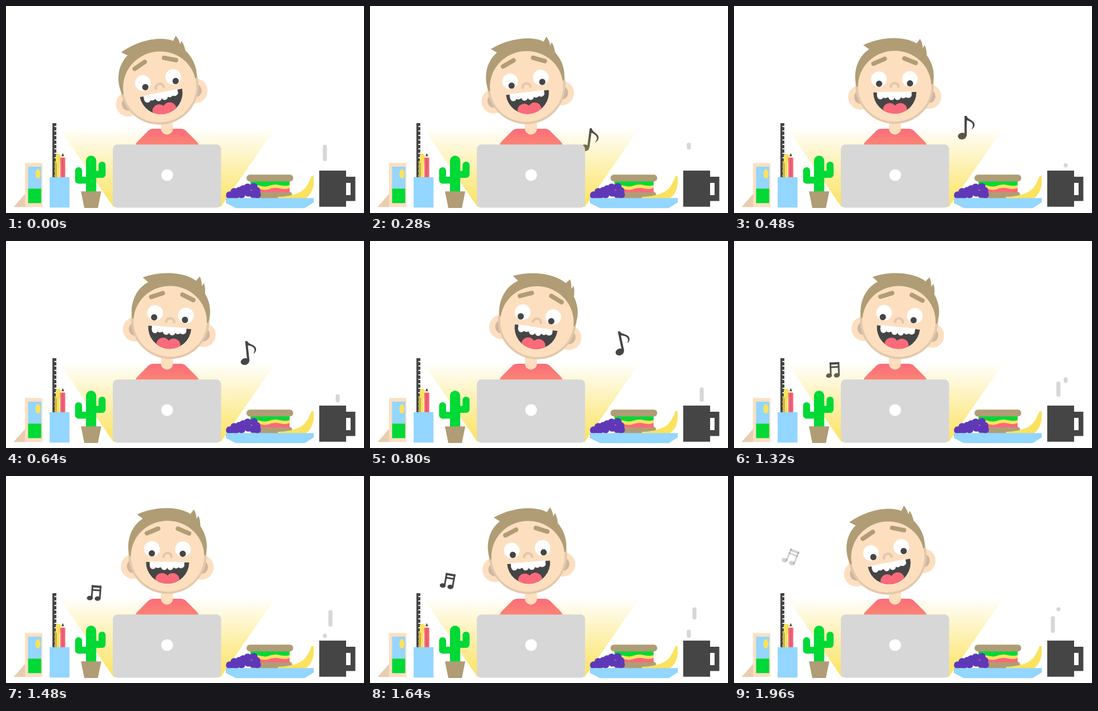
Recreate the animation shown at these times as an HTML page with a canvas. Size 640x371 px, loop 2000 ms.

```html
<!DOCTYPE html>
<html lang="en">
<head>
<meta charset="utf-8">
<title>Happy at the desk</title>
<style>
html, body { margin: 0; width: 100%; height: 100%; overflow: hidden; background: #fff; }
canvas { display: block; width: 640px; height: 371px; }
</style>
</head>
<body>
<canvas id="stage" width="640" height="371"></canvas>
<script>
const ctx = document.getElementById('stage').getContext('2d');
const LOOP = 2000;
const DARK = '#454545', GREY = '#d7d7d7', SKIN = '#fddfc0', SHADE = '#e2c9ab', EAR = '#cdb7a2',
  BROWN = '#b09d75', PINK = '#fb6a7b', BLUE = '#93d6ff', GREEN = '#00d936',
  YELLOW = '#fbe25e', PURPLE = '#5f38b8', WHITE = '#fff';

const smooth = p => { p = Math.min(1, Math.max(0, p)); return p * p * (3 - 2 * p); };

function fill(color, path) {
  ctx.fillStyle = color;
  ctx.fill(new Path2D(path));
}
function rect(color, x, y, w, h, r = 0) {
  ctx.fillStyle = color;
  ctx.beginPath();
  ctx.roundRect(x, y, w, h, r);
  ctx.fill();
}
function oval(color, x, y, rx, ry = rx, turn = 0) {
  ctx.fillStyle = color;
  ctx.beginPath();
  ctx.ellipse(x, y, rx, ry, turn, 0, 7);
  ctx.fill();
}
function line(color, width, path) {
  ctx.strokeStyle = color;
  ctx.lineWidth = width;
  ctx.lineCap = 'round';
  ctx.stroke(new Path2D(path));
}
function placed(x, y, degrees, draw) {
  ctx.save();
  ctx.translate(x, y);
  ctx.rotate(degrees * Math.PI / 180);
  draw();
  ctx.restore();
}

function singleNote() {
  oval(DARK, -7.2, 15.3, 7.7, 6, -0.15);
  fill(DARK, 'M-3 -21H1C2 -14 15 -14 15 -5C15 -2 13 1 10 3C9 2 12 0 12 -4C12 -9 6 -12 1 -13V15H-3Z');
}
function doubleNote() {
  oval(DARK, -7.8, 10.5, 5.3, 4, -0.1);
  oval(DARK, 6.2, 10.5, 5.3, 4, -0.1);
  rect(DARK, -6, -13, 3, 24);
  rect(DARK, 8.5, -13, 3, 24);
  rect(DARK, -6, -13, 17, 4);
  rect(DARK, -6, -6, 17, 3);
}
function notes(t) {
  const fade = age => Math.min(1, (1000 - age) / 160);
  if (t < 1000) {
    ctx.globalAlpha = fade(t);
    placed(415 + 0.11 * (t - 480), 218 - 0.111 * (t - 480), -0.038 * (t - 480), singleNote);
  } else {
    ctx.globalAlpha = fade(t - 1000);
    placed(158.5 - 0.118 * (t - 1480), 209 - 0.135 * (t - 1480), 4 + 0.038 * (t - 1480), doubleNote);
  }
  ctx.globalAlpha = 1;
}

function mouth() {
  ctx.save();
  ctx.beginPath();
  ctx.arc(0, 0, 38.5, 0, Math.PI);
  ctx.clip();
  rect(DARK, -40, 0, 80, 40);
  oval(PINK, -9.5, 31, 12, 11.5);
  oval(PINK, 9.5, 31, 12, 11.5);
  rect(PINK, -10, 27, 20, 14);
  ctx.restore();
  rect(WHITE, -32, -0.8, 62, 10, [0, 0, 4, 4]);
  [[-26, 7], [-17, 5], [-6, 8.5], [5, 8.5], [15, 5.5], [24, 5]].forEach(([x, y]) => oval(WHITE, x, y, 5.6));
}

// Drawn upright in stage coordinates, turned about the top of the neck.
function head(swing) {
  placed(288, 211, 11.4 * swing, () => {
    ctx.translate(-288, -211);
    oval(SKIN, 226.8, 163, 22);
    oval(SKIN, 349, 163, 22);
    oval(EAR, 226.5, 162.5, 11, 12);
    oval(EAR, 349.5, 162.5, 11, 12);
    oval(SHADE, 288, 141.3, 70);
    fill(BROWN, 'M220 144C216 130 217 116 222 103C227 91 234 83 243 77L232.7 69.4' +
      'C249 62 267 57.5 288 57.5C304 58 318 61 328 67.5L334.3 59.5C337 64 339 70 339 76' +
      'L342.5 70.5C345 76 346 82 346 89C355 102 358 114 358 126Q358 134 356 141Z');
    oval(SKIN, 288, 143.7, 65.5, 63.5);

    line(BROWN, 8, 'M250.7 103L270.7 94.5');
    line(BROWN, 8, 'M306 94.2L326 102.4');
    for (const x of [260, 315.3]) {
      oval(WHITE, x, 131, 14);
      oval(DARK, x - 2.8 * swing, 139, 5.6);
    }
    line(SHADE, 4.5, 'M281 145C281 136 295 136 295 145');
    ctx.save();
    ctx.translate(288.2, 154.5);
    mouth();
    ctx.restore();
  });
}

function body() {
  fill(PINK, 'M231 250Q232 246 236 242L254 224Q258 220 264 220H312Q318 220 322 224L340 242Q344 246 345 250Z');
  rect(SKIN, 277, 200, 21.5, 30.5, [0, 0, 10.7, 10.7]);
}

function glow() {
  const g = ctx.createLinearGradient(0, 217, 0, 361);
  g.addColorStop(0, 'rgba(251,226,94,0)');
  g.addColorStop(1, 'rgba(251,226,94,1)');
  fill(g, 'M94 217L192 360H384L483 217Z');
}

function laptop() {
  rect(GREY, 191, 248.3, 193.5, 113.2, 8);
  oval(WHITE, 288, 303, 10.5);
}

function leftSide() {
  fill('#e9cdb0', 'M13.5 360.3L34 337V360.3Z');
  rect(SKIN, 34, 281.5, 31, 78.8);
  rect(BLUE, 39.5, 288, 23.5, 39.5);
  rect(GREEN, 39.5, 327.3, 23.5, 26);
  oval(YELLOW, 57, 301, 4.5, 8.5);

  rect(DARK, 83, 210, 7, 98);
  for (let y = 215; y < 305; y += 8) rect(WHITE, 86.5, y, 3.5, 2);
  rect('#c9b341', 87, 278, 9, 30);
  rect(YELLOW, 89, 265, 9, 17, 4);
  rect(YELLOW, 91, 279, 5, 28);
  fill(SKIN, 'M97 274L101.5 264L106 274Z');
  fill(DARK, 'M99.2 269L101.5 263.5L103.8 269Z');
  rect(PINK, 97, 272, 9, 36);
  rect('#e25869', 100, 272, 3, 36);
  rect(BLUE, 78, 306.7, 35.5, 54.5);

  rect(GREEN, 143, 268.3, 18.3, 66, [9, 9, 0, 0]);
  rect(GREEN, 123.5, 289, 12.5, 29.3, [6, 6, 0, 6]);
  rect(GREEN, 128, 306, 17, 12.3);
  rect(GREEN, 165.5, 279, 12.5, 29, [6, 6, 6, 0]);
  rect(GREEN, 159, 295.5, 14, 12.5);
  fill(BROWN, 'M134 332.3H170.3L164.3 362H140Z');
}

function food() {
  rect(BROWN, 436, 333, 75.5, 12, 5);
  rect(PINK, 437, 321, 70, 13);
  fill(YELLOW, 'M437 318H507V326C498 330 492 327 484 326C474 325 468 331 458 329C450 327 445 326 437 328Z');
  fill(GREEN, 'M437 313H507V321C498 324 492 321 484 320C474 319 468 325 458 323C450 321 445 320 437 322Z');
  rect(BROWN, 430, 302.3, 83.5, 12.2, 6);
  fill(YELLOW, 'M546 305L549.7 304.5C551.5 321 549 335 536 345H486V342C512 341 527 335 535 326Q542 317 546 305Z');

  [[400, 339], [408, 333], [417, 331], [424, 328], [432, 325], [443, 324], [448, 331], [449, 338],
    [410, 340], [421, 338], [433, 335], [442, 337]].forEach(([x, y]) => oval(PURPLE, x, y, 6.8));
  fill(BLUE, 'M393 344.3H550.3V352L534 362.3H411L393 353Z');
}

function mug() {
  rect(DARK, 560, 295, 48, 64.8);
  rect(DARK, 606, 306, 18.5, 43.5);
  rect(WHITE, 608, 317, 8, 22);
}

function steam(t, x, base, start) {
  const age = (t - start + LOOP) % LOOP;
  if (age >= 1038) return;
  const top = base - 38 * smooth(age / 700);
  const end = base - 38 * smooth((age - 300) / 700);
  rect(GREY, x - 3.6, top - 3.6, 7.2, end - top + 7.2, 3.6);
}

function draw(t) {
  const swing = 2 * smooth(1 - Math.abs(t - 1000) / 1000) - 1;
  ctx.fillStyle = WHITE;
  ctx.fillRect(0, 0, 640, 371);
  notes(t);
  body();
  head(swing);
  glow();
  laptop();
  leftSide();
  food();
  steam(t, 593, 285.8, 440);
  steam(t, 580, 276.8, 940);
  steam(t, 570, 286.5, 1440);
  mug();
}

const began = performance.now();
function tick() {
  draw((performance.now() - began) % LOOP);
  requestAnimationFrame(tick);
}
tick();
</script>
</body>
</html>
```
